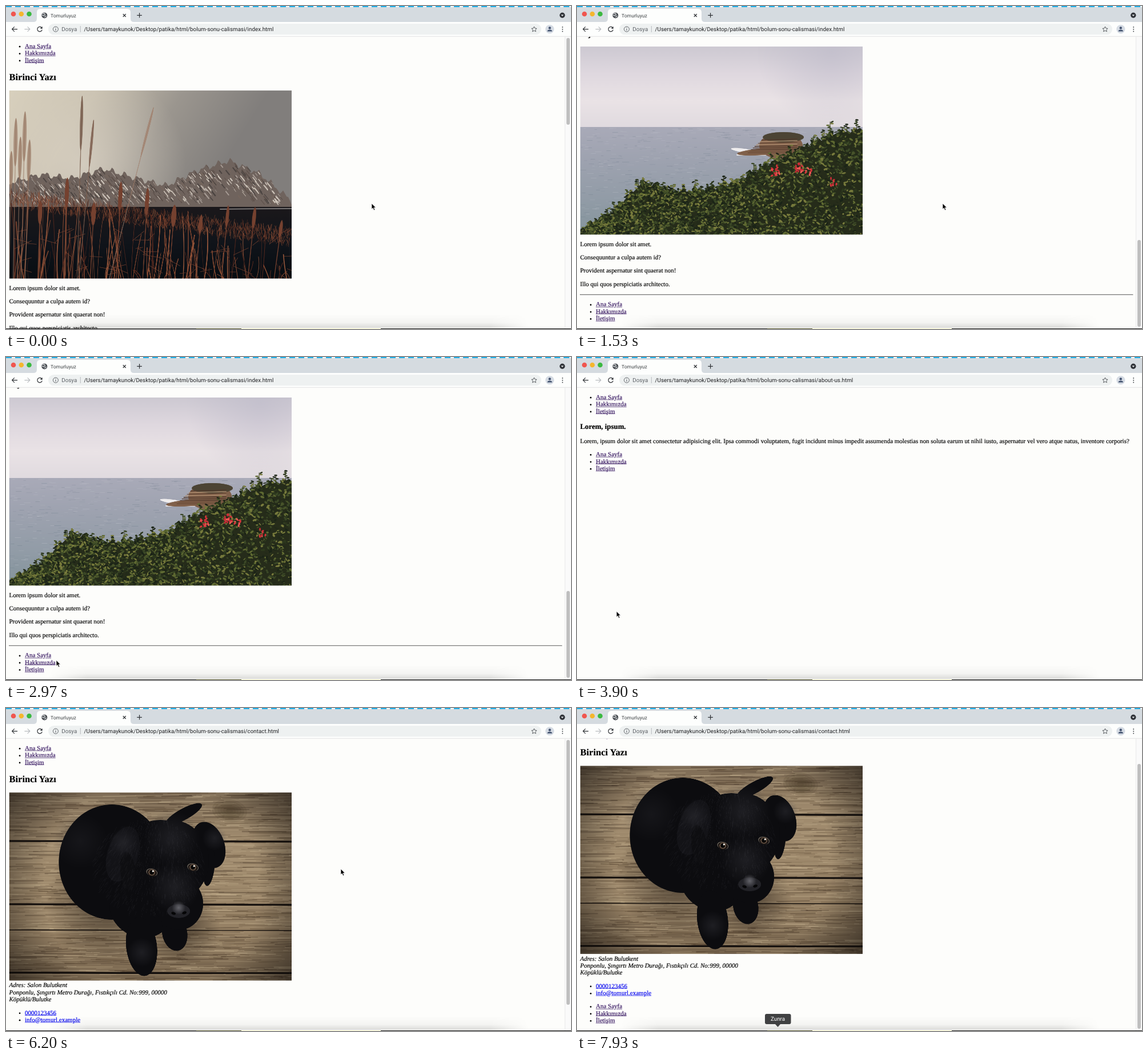
Animation of 989x566 px, one loop 7.96 s. Source, as an HTML page with a canvas:

```html
<!DOCTYPE html>
<html lang="tr">
<head>
<meta charset="utf-8">
<title>Tomurluyuz</title>
<style>
html, body { margin: 0; width: 100%; height: 100%; overflow: hidden; background: #fdfdfb; }
#stage { position: relative; width: 989px; height: 566px; overflow: hidden; background: #fdfdfb; }
#view { position: absolute; left: 0; top: 53.5px; width: 989px; height: 511.5px; overflow: hidden; }
.page {
  position: absolute; left: 0; top: 0; width: 1409px; padding: 0 8px; display: flow-root;
  transform-origin: 0 0; visibility: hidden; color: #000; -webkit-text-stroke: .25px;
  font: 16px/18px "Liberation Serif", Times, serif; text-rendering: geometricPrecision;
}
#about { width: 1424px; }
.page ul { margin: 16px 0; padding-left: 40px; }
.page p { margin: 16px 0; }
h2 { font-size: 24px; line-height: 27px; margin: 19.92px 0; }
h3 { font-size: 18.72px; line-height: 21px; margin: 18.72px 0; }
hr { margin: 16px 0; border: 1px inset #999; height: 0; }
canvas { display: block; width: 720px; margin-bottom: 4px; }
.page u { color: #32125e; }
.page u.new { color: #0000ee; }
address { font-style: italic; }
#bar { position: absolute; left: 978px; top: 53.5px; width: 11px; height: 511px; background: #fafafa; box-shadow: inset 1px 0 #e9e9e9; }
#thumb { position: absolute; left: 3.3px; width: 5.6px; border-radius: 3px; background: #bfbfbf; }
svg { position: absolute; left: 0; top: 0; }
svg, #glow { pointer-events: none; }
svg text { font-family: Roboto, Arial, sans-serif; text-rendering: geometricPrecision; }
#glow {
  position: absolute; left: 75px; top: 540px; width: 840px; height: 24px;
  background: linear-gradient(#0000, #00000009 60%, #0002);
  mask: linear-gradient(90deg, #0000, #000 8%, #000 92%, #0000);
}
#edge {
  position: absolute; left: 0; top: 564.5px; width: 989px; height: 1.5px;
  background: linear-gradient(90deg, #111 333px, #4b4b22 333px 412px, #f4f2c4 412px 656px, #111 656px);
}
#dash {
  position: absolute; left: 0; top: 0; width: 989px; height: 1.5px;
  background: repeating-linear-gradient(90deg, #20ade6 0 10px, #f2f7f9 10px 16px);
}
</style>
</head>
<body>
<div id="stage">
  <div id="view">
    <div class="page" id="home"></div>
    <div class="page" id="about"></div>
    <div class="page" id="contact"></div>
  </div>
  <div id="bar"><div id="thumb"></div></div>
  <svg width="989" height="566" fill="none">
    <path d="M0 0H989V28H0Z" fill="#d5dbe0"/>
    <path d="M0 28H989V53H0Z" fill="#fdfefd"/>
    <path d="M0 53.3H989" stroke="#dcdedf" stroke-width=".8"/>
    <path d="M48 28q6 0 6-6V11q0-6 6-6H212q6 0 6 6V22q0 6 6 6Z" fill="#fdfefd"/>
    <circle cx="13" cy="14" r="4.3" fill="#f0564f"/>
    <circle cx="26.8" cy="14" r="4.3" fill="#f5b62e"/>
    <circle cx="40.5" cy="14" r="4.3" fill="#3bb940"/>
    <circle cx="67.3" cy="16.4" r="5" fill="#4a4e53"/>
    <path d="M64 14q3-2 4 0t-2 3l-3-1M68 20q0-3 3-2" stroke="#e9edef" stroke-width="1.2"/>
    <text x="78" y="19.5" font-size="8.6" fill="#3c4043">Tomurluyuz</text>
    <g stroke="#2f3236" stroke-width="1.2">
      <path d="M204.8 14l5 5m0-5l-5 5M229.3 16.3h8.6m-4.3-4.3v8.6"/>
      <path d="M20 40.6H10.6m4.2-4.2l-4.2 4.2 4.2 4.2"/>
      <path d="M32.4 40.6h9.4m-4.2-4.2l4.2 4.2-4.2 4.2" stroke="#b9bcbf"/>
      <path d="M62.6 38.2A4.2 4.2 0 1 0 63.2 41.6"/>
    </g>
    <path d="M63.7 35.8v4h-4Z" fill="#2f3236"/>
    <circle cx="973.8" cy="16.3" r="4.7" fill="#303338"/>
    <path d="M971.5 15.2h4.6l-2.3 2.8Z" fill="#e6eaed"/>
    <rect x="74" y="31" width="863" height="19.2" rx="9.6" fill="#eef1f1"/>
    <circle cx="86.9" cy="40.6" r="4.5" stroke="#5f6368"/>
    <path d="M86.9 40v3M86.9 38v1.1" stroke="#5f6368" stroke-width="1.1"/>
    <text x="97.2" y="44" font-size="9.85" fill="#5f6368">Dosya</text>
    <path d="M130.3 35v11" stroke="#a9adb1" stroke-width=".8"/>
    <text id="url" x="136.5" y="44" font-size="9.85" fill="#202124"></text>
    <path d="M924.5 36l1.4 3 3.2.4-2.4 2.2.7 3.2-2.9-1.6-2.9 1.6.7-3.2-2.4-2.2 3.2-.4Z" stroke="#4a4e53" stroke-width=".9"/>
    <circle cx="951.8" cy="40.6" r="7.6" fill="#d6dce4"/>
    <circle cx="951.8" cy="38.4" r="2.2" fill="#42526e"/>
    <path d="M947.6 44.6q0-3 4.2-3t4.2 3Z" fill="#42526e"/>
    <path d="M974.2 37v.01m0 3.7v.01m0 3.7v.01" stroke="#44484c" stroke-width="1.9" stroke-linecap="round"/>
  </svg>
  <div id="dash"></div>
  <div id="glow"></div>
  <svg width="989" height="566">
    <g id="tip">
      <rect x="329" y="536" width="45.500" height="18" rx="3" fill="#404142"/>
      <path d="M347 554h9l-4.500 5Z" fill="#404142"/>
      <text x="351.500" y="548.300" font-size="9.8" text-anchor="middle" fill="#fff">Zunra</text>
    </g>
    <path id="arrow" d="M0 0V10l2.300-2.100 1.800 4 1.700-.8-1.700-3.800H7.300Z" stroke="#fff" stroke-width=".7"/>
    <path id="hand" d="M-1 1q1-1.500 2 0l1.200 3.500q2-1 2.500.3 1.600-.5 1.800.7 1.300-.2 1.500 1.200.6 3-.8 5.300H1.800Q.2 9.500-2.200 7.300-2.300 5.700.6 6.600Z" fill="#fff" stroke="#000" stroke-width=".9"/>
  </svg>
  <div id="edge"></div>
</div>
<script>
const $ = id => document.getElementById(id);
const LOOP = 7960, SCALE = 989 / 1440, VIEW = 511.5, TRACK = 507;
const clamp = u => Math.min(1, Math.max(0, u));
const ease = u => u * u * (3 - 2 * u);
const mix = (a, b, k) => a + (b - a) * k;

// Pages
const list = (items, cls = '') =>
  '<ul>' + items.map(s => `<li><u class="${cls}">${s}</u></li>`).join('') + '</ul>';
const paras = lines => lines.map(s => `<p>${s}</p>`).join('');
const nav = list(['Ana Sayfa', 'Hakkımızda', 'İletişim']);
const lorem = paras(['Lorem ipsum dolor sit amet.', 'Consequuntur a culpa autem id?',
  'Provident aspernatur sint quaerat non!', 'Illo qui quos perspiciatis architecto.']);
const picture = (title, name) => `<h2>${title} Yazı</h2><canvas id="${name}"></canvas>`;
const post = (title, name) => picture(title, name) + lorem + '<hr>';

$('home').innerHTML = nav + post('Birinci', 'field') + post('İkinci', 'haze') + post('Üçüncü', 'coast') + nav;
$('about').innerHTML = nav + '<h3>Lorem, ipsum.</h3>' + paras([
  'Lorem, ipsum dolor sit amet consectetur adipisicing elit. Ipsa commodi voluptatem, fugit incidunt minus impedit assumenda molestias non soluta earum ut nihil iusto, aspernatur vel vero atque natus, inventore corporis?'
]) + nav;
$('contact').innerHTML = nav + picture('Birinci', 'dog') +
  '<address>Adres: Salon Bulutkent<br>Ponponlu, Şıngırtı Metro Durağı, Fıstıkçılı Cd. No:999, 00000<br>Köpüklü/Bulutke</address>' +
  list(['0000123456', 'info@tomurl.example'], 'new') + nav;

// Pictures, drawn in a space 495 wide
const W = 495, H = 330;
let g, seed;
const rnd = (a = 0, b = 1) => mix(a, b, (seed = seed * 16807 % 2147483647) / 2147483647);
const pick = colors => colors[Math.floor(rnd(0, colors.length))];
const repeat = (n, draw) => { for (let i = 0; i < n; i++) draw(i); };

function board(id, h = H) {
  const c = $(id);
  c.width = W * 2;
  c.height = h * 2;
  c.style.height = h * 16 / 11 + 'px';
  g = c.getContext('2d');
  g.scale(2, 2);
  g.lineCap = 'round';
  seed = 41;
}
function fill(colors, y0, y1, tilt = 0) {
  const f = g.createLinearGradient(0, y0, tilt, y1);
  colors.forEach((c, i) => f.addColorStop(i / (colors.length - 1), c));
  g.fillStyle = f;
  g.fillRect(0, y0, W, y1 - y0);
}
function glow(color, x, y, r) {
  const f = g.createRadialGradient(x, y, 0, x, y, r);
  f.addColorStop(0, color);
  f.addColorStop(1, color.slice(0, 7) + '00');
  g.fillStyle = f;
  g.fillRect(x - r, y - r, 2 * r, 2 * r);
}
function oval(color, x, y, rx, ry, turn = 0) {
  g.beginPath();
  g.ellipse(x, y, rx, ry, turn, 0, 7);
  g.fillStyle = color;
  g.fill();
}
function line(color, w, x0, y0, x1, y1, bend = 0) {
  g.beginPath();
  g.moveTo(x0, y0);
  g.quadraticCurveTo((x0 + x1) / 2 + bend, (y0 + y1) / 2, x1, y1);
  g.strokeStyle = color;
  g.lineWidth = w;
  g.stroke();
}
// Height of a rough outline through evenly spaced key heights
const outline = (keys, rough) => x => {
  const u = clamp(x / W) * (keys.length - 1), i = Math.min(Math.floor(u), keys.length - 2);
  return mix(keys[i], keys[i + 1], u - i) + rough * (Math.sin(x * .27) + Math.sin(x * .61 + 1) * .7);
};
function land(color, top, bottom) {
  g.beginPath();
  g.moveTo(0, bottom);
  for (let x = 0; x <= W; x += 3) g.lineTo(x, top(x));
  g.lineTo(W, bottom);
  g.fillStyle = color;
  g.fill();
}

function drawField() {
  board('field');
  fill(['#d8d0bd', '#c8c0af', '#9b968f', '#817e7c'], 0, 206, 330);
  glow('#ddd5c7bb', 130, 130, 180);
  const ridge = outline([162, 147, 154, 137, 153, 167, 140, 123, 146, 194], 4);
  land('#6f635d', ridge, 206);
  repeat(750, () => {
    const x = rnd(0, 475), y = ridge(x) + rnd(2, 50), s = rnd(3, 9);
    if (y + s < 200) line(pick(['#cfc6bb', '#d6cdc488', '#4b4441', '#5e514b', '#75665d']), rnd(.6, 2.2), x, y, x + s * .8, y + s);
  });
  fill(['#1b181b', '#10141a', '#080d12'], 204, H);
  line('#777474', 2, 370, 208, W, 207);
  const rust = ['#74402d', '#8a4c33', '#55291f', '#94563b', '#3d211c'];
  const bank = x => 192 + x * .14;
  repeat(1100, () => {
    const x = rnd(0, W), y = bank(x) + rnd(-12, 14);
    line(pick(rust) + '99', .9, x, y, x + rnd(-5, 5), y - rnd(4, 13));
  });
  repeat(140, () => {
    const x = rnd(0, W);
    line(pick(rust), rnd(.6, 1.7), x, 332, x + rnd(-17, 17), bank(x) + rnd(-25, 100), rnd(-6, 6));
  });
  repeat(45, () => {
    const x = rnd(0, W), y = rnd(240, H);
    line('#7b4430aa', 1, x, y, x + rnd(8, 34), y + rnd(-17, 17));
  });
  const ear = (color, x, y, foot, w) => {
    const turn = Math.atan2(foot - x, H - y), len = (H - y) * .3;
    line(color, 1.3, foot, 332, x, y);
    oval(color, x + Math.sin(turn) * len / 2, y + Math.cos(turn) * len / 2, w, len / 2, -turn);
  };
  ear('#765a4acc', 128, 10, 119, 2.6);
  ear('#7f604fcc', 148, 52, 122, 2.2);
  ear('#a1806caa', 253, 30, 175, 2.2);
  repeat(5, i => ear('#977560aa', 4 + i * 8, rnd(30, 110), i * 7, 3.5));
  repeat(10, i => ear('#75412f', 55 + i * 47, rnd(150, 235), 50 + i * 46, rnd(2.5, 4.5)));
}

function drawHaze() {
  board('haze', 478);
  fill(['#c9ccd0', '#a9adb0', '#6c7273', '#33393a'], 0, 478);
}

function drawCoast() {
  board('coast');
  fill(['#cdc9d2', '#dfd8df', '#eae3e6', '#e0dadf'], 0, 142);
  glow('#bdbac999', 440, 10, 130);
  fill(['#a9aab8', '#9da2af', '#929ca7', '#84949c'], 141, H);
  repeat(900, () => {
    const x = rnd(0, W), y = rnd(143, H);
    line(pick(['#c3c6d055', '#6b7b8955']), .7, x, y, x + rnd(3, 12), y);
  });
  oval('#efedee', 290, 183, 26, 3.5, .15);
  line('#efedee', 2, 275, 190, 365, 190);
  oval('#80604a', 352, 174, 38, 23);
  oval('#80604a', 325, 184, 50, 6, -.08);
  oval('#4c4434', 356, 159, 36, 9);
  repeat(9, i => line(pick(['#b08e70', '#52392b', '#6b4c38']), 1.3, 318 - i * 3, 164 + i * 2.8, 380, 162 + i * 3, 5));
  const top = outline([326, 292, 236, 254, 250, 238, 204, 180, 152, 144], 3);
  land('#262c1a', top, H);
  const leaf = ['#47532a', '#5f6a32', '#2c371d', '#777a3c', '#1b2417', '#222a19', '#3a4726'];
  repeat(3800, () => {
    const x = rnd(0, W), y = mix(top(x) - 4, 334, rnd());
    oval(pick(leaf), x, y, rnd(1.5, 4.2), rnd(.8, 2), rnd(-1.2, 1.2));
  });
  repeat(26, i => {
    const x = i * 19 + rnd(0, 12), tip = top(x) - rnd(4, 17);
    line('#42452a', 1, x, top(x), x, tip);
    repeat(6, k => oval(pick(leaf), x + rnd(-4, 4), tip + k * 3, 3, 1.3, rnd(-.6, .6)));
  });
  const flower = (x, y, n) => repeat(n, () =>
    oval(pick(['#d3343a', '#c22c35', '#ee5b56']), x + rnd(-7, 7), y + rnd(-9, 9), 2.6, 1.5, rnd(0, 3)));
  flower(343, 218, 16);
  flower(384, 213, 16);
  flower(398, 221, 7);
  flower(445, 236, 8);
}

function drawDog() {
  board('dog');
  fill(['#7d6b55', '#a18c6f', '#9c876a', '#958064', '#78664f'], 0, H);
  repeat(1500, () => {
    const x = rnd(-40, W), y = rnd(0, H);
    line(pick(['#cfbb9850', '#bda98850', '#3a2c2055', '#55432f55']), rnd(.6, 2.2), x, y, x + rnd(15, 95), y + rnd(-1.5, 1.5));
  });
  repeat(6, i => oval('#47392b28', 386, 32, 6 + i * 5, 4 + i * 3.2, .15));
  [85, 196, 241, 316].forEach(y => {
    line('#17120f', y === 241 ? 1.5 : 3.2, 0, y, W, y + 1);
    line('#c0ab8a66', 1, 0, y + 3, W, y + 4);
  });
  const shade = g.createRadialGradient(250, 165, 190, 250, 165, 320);
  shade.addColorStop(0, '#0b080600');
  shade.addColorStop(1, '#0b0806aa');
  g.fillStyle = shade;
  g.fillRect(0, 0, W, H);
  glow('#120d0a88', 170, 195, 105);
  glow('#120d0a88', 300, 235, 70);

  const coat = '#0c0c0f', sheen = '#34343a77';
  oval(coat, 180, 122, 93, 101);           // body
  oval(coat, 265, 118, 72, 70);            // shoulders
  oval(coat, 230, 205, 56, 48, .5);        // chest
  oval(coat, 232, 270, 27, 52, -.12);      // front legs
  oval(coat, 290, 246, 22, 32, -.2);
  oval(coat, 306, 38, 36, 10, -.5);        // tail
  oval(coat, 350, 92, 27, 42, -.35);       // ears
  oval(coat, 350, 130, 10, 34, .1);
  oval(coat, 284, 120, 66, 72);            // head
  oval(coat, 298, 195, 42, 46);            // muzzle
  glow('#26262b66', 125, 85, 50);
  glow(sheen, 285, 80, 50);
  glow(sheen, 290, 165, 45);
  glow(sheen, 360, 80, 22);
  glow(sheen, 232, 280, 26);
  oval('#131317', 199, 108, 27, 50, .3);
  oval('#0e0e11', 208, 138, 13, 34, -.1);
  glow(sheen, 200, 88, 26);
  repeat(900, () => {
    const a = rnd(0, 6.3), d = Math.sqrt(rnd()), x = 245 + Math.cos(a) * d * 95, y = 128 + Math.sin(a) * d * 85;
    line('#5a5a6422', .6, x, y, x + (x - 270) * .05, y + rnd(4, 9));
  });
  for (const [x, y] of [[250, 140], [322, 131]]) {
    oval('#6b645b', x, y, 10, 6.5, .25);
    oval('#1a1513', x, y + .5, 8.8, 6.2, .25);
    oval('#5f4c3e', x, y, 6, 5.6);
    oval('#050505', x, y, 3.9, 4);
    oval('#f2efe9', x + 2, y - 2, 1.6, 1.5);
  }
  oval('#222227', 297, 208, 20, 12);
  glow('#85858caa', 297, 202, 12);
  oval('#050506', 288, 212, 4, 2.4, .3);
  oval('#050506', 307, 211, 4, 2.4, -.3);
}
drawField();
drawHaze();
drawCoast();
drawDog();

// Timeline
const BASE = '/Users/tamaykunok/Desktop/patika/html/bolum-sonu-calismasi/';
const pages = [
  { from: 0, id: 'home', file: 'index', scroll: [1130, 1540] },
  { from: 3430, id: 'about', file: 'about-us', scroll: [0, 1] },
  { from: 5260, id: 'contact', file: 'contact', scroll: [6210, 6420] }
];
for (const p of pages) p.max = Math.max(0, $(p.id).offsetHeight * SCALE - VIEW);

const HOME = [640, 346];
const legs = [ // start, end, x, y
  [2080, 2850, 88, 531.5], [2990, 3180, 72, 533], [3600, 4500, 61, 198],
  [5360, 6020, 586, 282], [6850, 7520, 352, 567]
];
const pointer = t => legs.reduce(([px, py], [a, b, x, y]) => {
  const k = ease(clamp((t - a) / (b - a)));
  return [mix(px, x, k), mix(py, y, k)];
}, HOME);

function render(t) {
  const page = pages.filter(p => p.from <= t).pop(), { max, scroll: [a, b] } = page;
  const y = max * (1 - Math.pow(1 - clamp((t - a) / (b - a)), 2.6));
  for (const p of pages) $(p.id).style.visibility = p === page ? 'visible' : 'hidden';
  $(page.id).style.transform = `translateY(${-y}px) scale(${SCALE})`;
  $('url').textContent = BASE + page.file + '.html';
  $('bar').style.display = max ? '' : 'none';
  $('thumb').style.height = TRACK * VIEW / (VIEW + max) + 'px';
  $('thumb').style.top = 2 + TRACK * y / (VIEW + max) + 'px';

  const [px, py] = pointer(t), under = document.elementFromPoint(px, py);
  const shape = under && under.tagName === 'U' ? 'hand' : 'arrow';
  for (const id of ['arrow', 'hand']) {
    $(id).setAttribute('transform', `translate(${px} ${py})`);
    $(id).style.display = id === shape ? '' : 'none';
  }
  $('tip').style.display = t >= 7560 ? '' : 'none';
}

const start = performance.now();
function tick() {
  render((performance.now() - start) % LOOP);
  requestAnimationFrame(tick);
}
tick();
</script>
</body>
</html>
```
